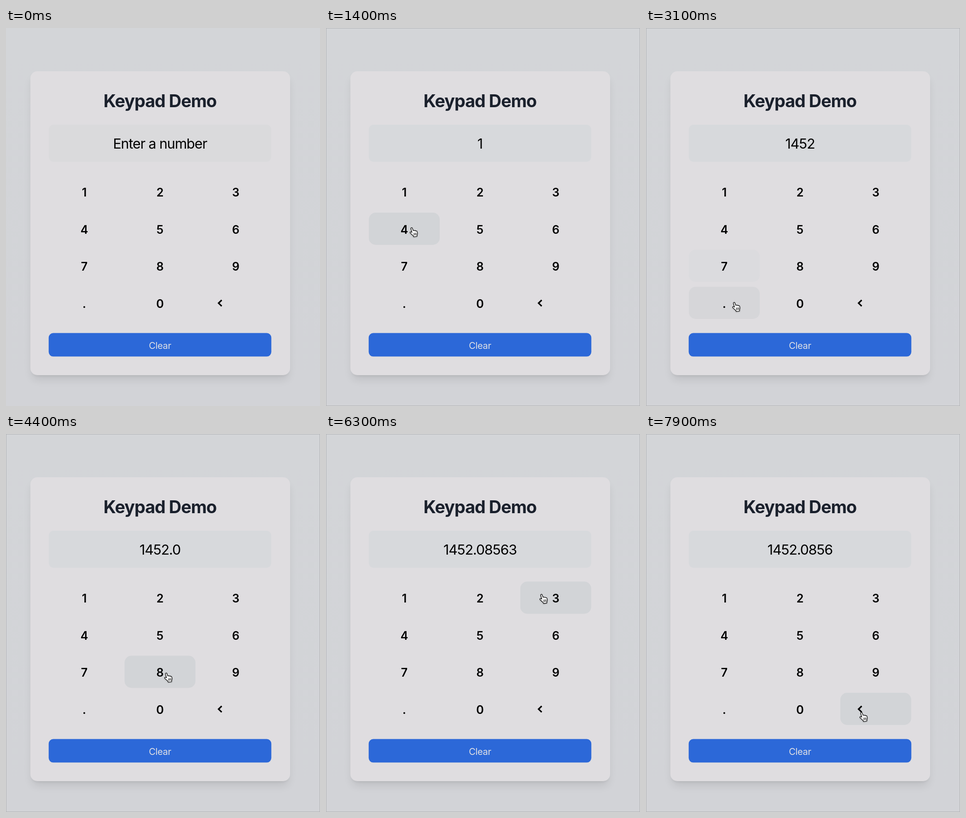
Animation, 682 px wide and 821 px high, one loop 8 s. Source, as an HTML page:

```html
<!DOCTYPE html>
<html lang="en">
<head>
<meta charset="utf-8">
<title>Keypad Demo</title>
<style>
  html, body { margin: 0; width: 100%; height: 100%; overflow: hidden; }
  body { background: linear-gradient(#d3d5d8, #d2d3d7); }
  #card {
    position: absolute; left: 53px; top: 94px; width: 563.5px; height: 659.5px;
    border-radius: 15px; background: #dfdde0;
    box-shadow: 0 12.6px 19px -4px rgba(0, 0, 0, .1), 0 5px 7.5px -5px rgba(0, 0, 0, .1);
  }
  svg { position: absolute; left: 0; top: 0; }
  text { font-family: Inter, Roboto, sans-serif; text-anchor: middle; }
  #title { font-size: 37.7px; font-weight: 700; letter-spacing: -.025em; fill: #1a202c; }
  #value { font-size: 30.2px; letter-spacing: -.033em; }
  #clear { font-size: 20.1px; letter-spacing: -.02em; fill: #dfe0e4; }
  #keys text { font-size: 25.1px; font-weight: 600; }
  #keys rect { fill: #d2d4d7; }
  #hand {
    stroke: #000; stroke-linejoin: round; stroke-linecap: round;
    filter: drop-shadow(0 1px 1px rgba(0, 0, 0, .3));
  }
</style>
</head>
<body>
<div id="card"></div>
<svg width="682" height="821" viewBox="0 0 682 821">
  <text id="title" x="334.5" y="172">Keypad Demo</text>
  <rect id="display" x="93" y="210" width="483" height="80.5" rx="10"/>
  <text id="value" x="334.5" y="262"></text>
  <g id="keys"></g>
  <path d="M468.5 591l-6.8 6.6 6.8 6.6" fill="none" stroke="#000" stroke-width="3.2"/>
  <rect x="92.7" y="662.6" width="483.6" height="51" rx="10" fill="#2c68d8"/>
  <text id="clear" x="334.5" y="696.5">Clear</text>
  <g id="live">
    <rect x=".5" y=".5" width="681" height="820" fill="none" stroke="#b3b4b7"/>
    <g id="hand">
      <path fill="#fff" stroke-width="1.2" d="M3.3 3.2C2.8 1.4 5.6.2 6.5 2.2L8.4 7.6C9.2 6.6 10.8 6.8 11.4 8
        C12.3 7 13.8 7.3 14.2 8.6C15.2 7.9 16.5 8.4 16.9 9.6C17.8 12 18 14.5 16.8 17L16.6 20L9.4 21L8.6 18.8
        C6.5 17.2 4.6 15 2.6 13.4C.4 11.6 1.8 9.6 4 10.6L5.8 11.6Z"/>
      <path fill="none" d="M10 13v4.5M12.4 12.8v4.5M14.8 12.6v4.4"/>
    </g>
  </g>
</svg>
<script>
const LOOP = 8000, STEP = 100, START = 600, FIRST_PRESS = 880;
const LABELS = '123456789.0<', PRESSES = '1452.085639<<';
const KEY_W = 154, KEY_H = 70;
const TAP_X = [186, 348, 468]; // where the fingertip lands in each column
const NS = 'http://www.w3.org/2000/svg';
const $ = id => document.getElementById(id);

function add(tag, attrs) {
  const el = document.createElementNS(NS, tag);
  for (const name in attrs) el.setAttribute(name, attrs[name]);
  return $('keys').appendChild(el);
}

const keys = [...LABELS].map((label, i) => {
  const col = i % 3, row = Math.floor(i / 3);
  const x = 93 + col * 164.5, y = 320.5 + row * 80.5;
  const rect = add('rect', { x, y, width: KEY_W, height: KEY_H, rx: 15 });
  if (label !== '<') add('text', { x: x + KEY_W / 2, y: y + 45.5 }).textContent = label;
  return { x, y, rect, tapX: TAP_X[col], tapY: 348 + row * 85.5 };
});

// The pause between two presses grows with the distance between the keys
const stops = [{ at: START, x: 260, y: 330, label: '' }];
for (const label of PRESSES) {
  const { tapX: x, tapY: y } = keys[LABELS.indexOf(label)];
  const last = stops[stops.length - 1];
  const at = last.label ? last.at + 500 + .7 * Math.hypot(x - last.x, y - last.y) : FIRST_PRESS;
  stops.push({ at, x, y, label });
}

// Fingertip: rest briefly after a press, glide, then settle before the next
function pointer(t) {
  if (t < START) return null;
  const i = stops.findIndex(s => s.at > t);
  if (i < 0) return stops[stops.length - 1];
  const a = stops[i - 1], b = stops[i];
  const f = ((t - a.at) / (b.at - a.at) - .15) / .6;
  const k = Math.min(1, Math.max(0, f));
  const ease = k * k * (3 - 2 * k);
  return { x: a.x + (b.x - a.x) * ease, y: a.y + (b.y - a.y) * ease };
}

function isOver(key, t) {
  const p = pointer(t);
  return p && p.x >= key.x && p.x <= key.x + KEY_W && p.y >= key.y && p.y <= key.y + KEY_H;
}

// Share of the last moments spent over the key, which fades the highlight
function highlight(key, t) {
  let n = 0;
  for (let i = 0; i < 6; i++) if (isOver(key, t - i * 20)) n++;
  return n / 6;
}

function typed(t) {
  return stops.filter(s => s.at <= t).reduce((text, { label }) =>
    label === '<' ? text.slice(0, -1) : text + label, '');
}

function draw(now) {
  const t = Math.floor(now % LOOP / STEP) * STEP;
  const p = pointer(t);
  $('value').textContent = typed(t) || 'Enter a number';
  $('display').setAttribute('fill', p ? '#d7d9dc' : '#dadadc');
  $('live').setAttribute('visibility', p ? 'visible' : 'hidden');
  if (p) $('hand').setAttribute('transform', `translate(${p.x - 5} ${p.y - 1})`);
  for (const key of keys) key.rect.setAttribute('opacity', highlight(key, t));
}

const begin = performance.now();
function tick() {
  draw(performance.now() - begin);
  requestAnimationFrame(tick);
}
tick();
</script>
</body>
</html>
```
